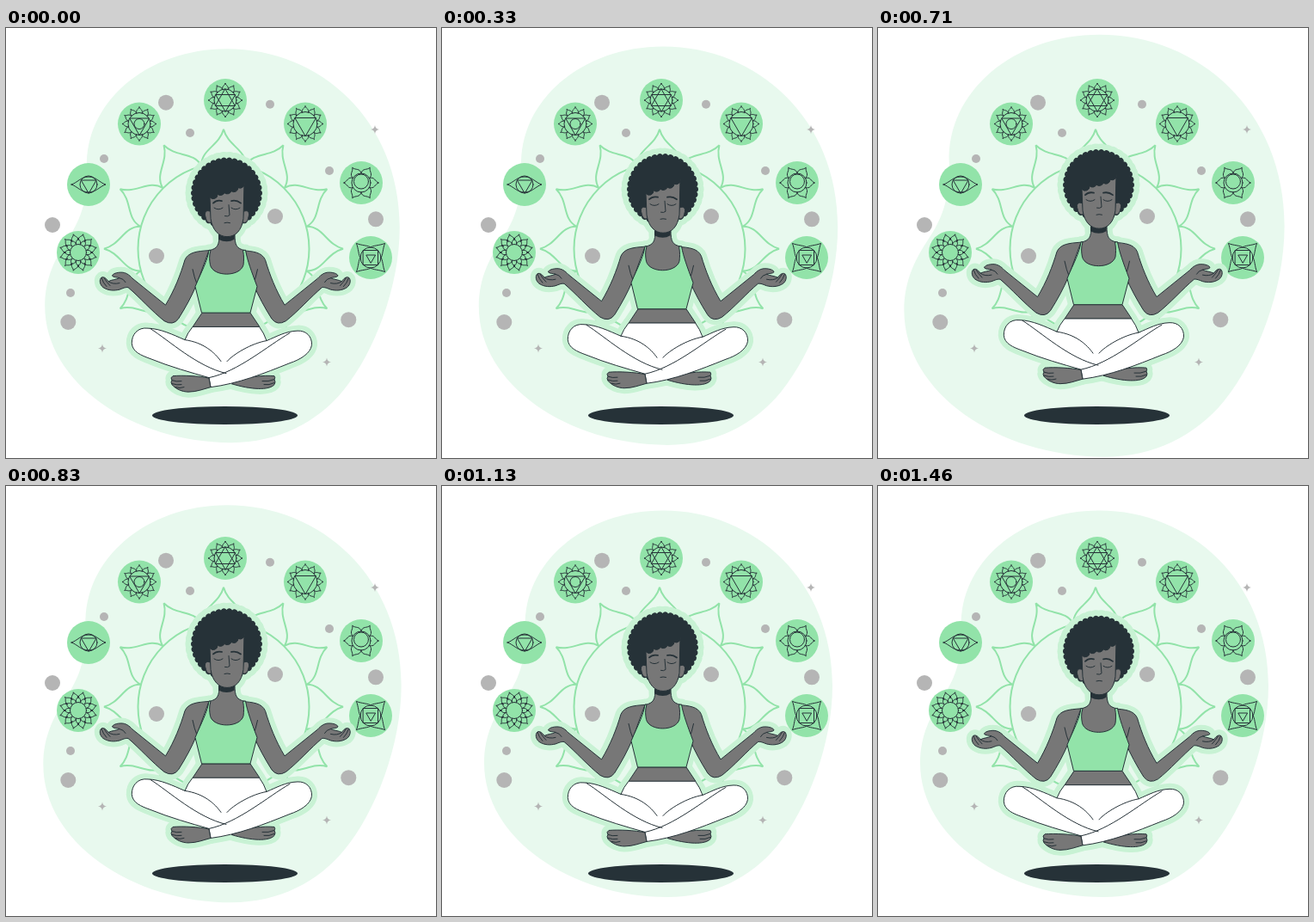
An HTML page for the animation above (1.5 s loop, 500 px wide and 500 px high).

```html
<!DOCTYPE html>
<html lang="en">
<head>
<meta charset="utf-8">
<title>Floating meditation</title>
<style>
  html, body { margin: 0; width: 100%; height: 100%; overflow: hidden; background: #fff; }
  svg { display: block; width: 100vw; height: 100vh; }
  .line { fill: none; stroke: #263238; stroke-width: 1; stroke-linecap: round; }
  .skin { fill: #777; stroke: #263238; }
  .green { fill: #92e3a9; stroke: #263238; }
  .white { fill: #fff; stroke: #263238; }
  .dark { fill: #263238; }
  .brow { fill: none; stroke: #263238; stroke-width: 1.8; stroke-linecap: round; }
  .lotus { fill: none; stroke: #92e3a9; stroke-width: 2; }
  .halo * { fill: #c8f2d4; stroke: #c8f2d4; stroke-width: 13; stroke-linejoin: round; }
</style>
</head>
<body>
<svg id="stage" viewBox="0 0 500 500"></svg>
<script>
const LOOP = 1500, LEAD = 27;
const stage = document.getElementById('stage');

const polar = (deg, r) => {
  const a = deg * Math.PI / 180;
  return `${(r * Math.sin(a)).toFixed(2)} ${(-r * Math.cos(a)).toFixed(2)} `;
};
const path = (cls, d) => `<path class="${cls}" d="${d}"/>`;
const at = (x, y, content) => `<g transform="translate(${x} ${y})">${content}</g>`;
const ring = r => `<circle class="line" r="${r}"/>`;
const mirror = content => content + `<g transform="translate(509.5 0) scale(-1 1)">${content}</g>`;

// Ring of n pointed petals between radii r0 and r1
function petals(n, r0, r1, twist = 0, bulge = .48) {
  const half = 180 / n, k = r1 - r0;
  let d = '';
  for (let i = 0; i < n; i++) {
    const mid = twist + i * 2 * half;
    const p = (side, r) => polar(mid + side * half, r0 + r * k);
    d += 'M' + p(-1, 0) + 'C' + p(-.85, bulge) + p(-.16, .5) + p(0, 1)
       + 'C' + p(.16, .5) + p(.85, bulge) + p(1, 0);
  }
  return d;
}
const flower = (...args) => path('line', petals(...args));
const triangle = (r, turn = 180) =>
  path('line', 'M' + [0, 120, 240].map(a => polar(a + turn, r)).join('L') + 'Z');

const chakras = [
  [155, 111.5, ring(13) + flower(12, 13, 20, 0, .7) + triangle(13) + ring(6)],
  [255, 84, ring(13) + flower(12, 13, 20, 0, .7) + triangle(13) + triangle(13, 0)],
  [348, 111.5, ring(14) + flower(12, 14, 21, 0, .7) + triangle(14)],
  [96, 182, ring(10) + triangle(10) +
    path('line', 'M-20 0C-13-2-9-9 0-9S13-2 20 0C13 2 9 9 0 9S-13 2-20 0Z')],
  [413, 180, ring(11) + flower(6, 11, 20.5, 30, .7) + `<circle class="line" cy="-1.5" r="8.5"/>`],
  [84, 261, ring(9.5) + flower(12, 10, 17, 0, .7) + flower(12, 14.5, 22, 15, .7)],
  [424, 267, ring(12) + flower(4, 12, 23.5, 45, .2) + path('line', 'M-8.5-8.5h17v17h-17Z') + triangle(6)]
].map(([x, y, symbol]) => at(x, y, '<circle r="25" fill="#92e3a9"/>' + symbol)).join('');

const dots = [
  [186, 86.7, 9], [307, 88.7, 5], [214, 122, 5], [114, 152, 5], [376, 166, 5], [54, 229, 9],
  [430, 222.3, 9], [313, 219, 9], [175, 265, 9], [75, 308, 5], [72.3, 342, 9], [398.3, 339.2, 9]
].map(([x, y, r]) => `<circle cx="${x}" cy="${y}" r="${r}"/>`).join('');
const stars = [[429, 118], [112, 372.5], [373, 388.5]]
  .map(([x, y]) => at(x, y, '<path d="M0-5Q.6-.6 5 0Q.6.6 0 5Q-.6.6-5 0Q-.6-.6 0-5Z"/>')).join('');

function hair() {
  const n = 38;
  let d = '';
  for (let i = 0; i <= n; i++) d += (i ? 'A3.8 3.8 0 0 1 ' : 'M') + polar(i * 360 / n, 39.8);
  return at(256.5, 192.3, path('dark', d + 'Z'));
}

const arm =
  path('skin', `M236 259C222 260 212 261 208 270C203 287 196 305 185.5 322.5L147 291.5C143 287 139 284.5 134 284.5
    C129 284.5 124 286 123.5 288.5C125 290.5 129 290 132 291C128 293 123 293 119 295C117 292 114 289 111 290.5
    C108 293 109 299 113 302C119 306 126 306 132 304.5C136 303 139 301.5 142 302C155 313 170 330 184 341
    Q194 347 200.5 338.5C209 325 216 312 221 300Z`) +
  path('line', 'M217 281Q219 291 222 298M132 291Q137 292 139 296M119 295Q124 299 132 297M111 291Q113 297 117 301M114 291Q117 296 121 300');

const face =
  path('skin', 'M238 214C233 211 230 215 232 220C233 226 236 228 239 226ZM276 214C281 211 284 215 282 220C281 226 278 228 275 226Z') +
  path('skin', `M237 197L238 222C240 236 248 243 257 243C267 243 274 236 276 222L277 180
    A5 5 0 0 1 270 186A5 5 0 0 1 262 190A5 5 0 0 1 254 192A5 5 0 0 1 246 193.5A5 5 0 0 1 237 197Z`) +
  path('brow', 'M241 204Q245 200 251 201.5M262 201.5Q268 200 273 204') +
  path('line', 'M242 209.5Q247 213 252 209.5M262 209.5Q267 213 272 209.5M259 206L260 218Q258 220 254.5 219M254 227Q257 226 260.5 227');

const torso =
  path('skin', 'M236 259C246 257 248 253 248 240H266C266 253 268 257 278 259L284 292H230Z') +
  path('dark', 'M247 240H266L265.5 246Q257 251 247 246Z') +
  path('skin', 'M228 331.5H284L295 348H217Z') +
  path('green', `M236 258.5C234 272 228 282 220 301L227.5 331.5H284L292 301C285 282 281 272 278.5 258.5L275.5 259
    C277 266 276.5 271 276 276C272 290 241 290 237.5 276C236.5 271 236 265 238 259Z`);

const legs =
  path('skin', 'M262 414C280 405 300 404 312 405Q313.5 407 312 409Q314 412 312 415C306 422 285 421 262 414Z') +
  path('line', 'M298 411Q305 412 312 409M300 415Q306 416 312 413') +
  path('white', `M217 347.8H294.5Q300 355 303 364C315 359 325 353 339 352.5C349 352 356 359 355.5 369
    C354 379 342 386 330 390C300 402 270 414 238 418L236 407C215 401 190 394 168 385C157 381 147 377 146.3 367
    C146 357 153 348 165 349.5C180 350 194 357 208 363Q211 355 217 347.8Z`) +
  path('line', `M208 363C230 366 243 378 250 388M303 364C285 367 264 380 257 388
    M168 350C190 364 222 394 256 402M330 355C304 370 270 400 236 407`) +
  path('skin', `M236 407.5C225 405 205 404 194 405Q190.5 407 193 410Q191 412 193 415C197 420 205 423.5 212 423.5
    C222 423.5 230 420 238 418Z`) +
  path('line', 'M193 410Q198 412 204 411M193 414Q199 416 204 415M197 418Q202 420 207 418');

const figure = mirror(arm) + hair() + torso + face + legs;

stage.innerHTML = `
  <path id="blob" fill="#e8f9ee" d="M257 28.5C363 28.5 454 110 454 232C454 300 425 375 390 418C360 455 315 478 262 478
    C150 478 49 410 49 322C49 289 62 266 75 246C88 226 98 205 97 165C94 90 165 28.5 257 28.5Z"/>
  ${at(253, 256.7, '<circle class="lotus" r="99.5"/>' + path('lotus', petals(12, 100, 139)))}
  <g fill="#b5b5b5">${dots}${stars}</g>
  ${chakras}
  <ellipse class="dark" cx="254.5" cy="450.5" rx="84.5" ry="10.5"/>
  <g id="floater"><g class="halo">${figure}</g>${figure}</g>`;

const blob = document.getElementById('blob');
const floater = document.getElementById('floater');
const beat = [[0, 0], [.1, 1], [.3, 0], [.4, 0], [.5, 1], [.6, 0], [1, 0]];

function pulse(p) {
  const i = beat.findIndex(([end]) => p < end);
  const [a, from] = beat[i - 1], [b, to] = beat[i];
  return from + (to - from) * (p - a) / (b - a);
}

function draw(now) {
  const p = (now + LEAD) % LOOP / LOOP;
  const lift = 10 * (1 - Math.abs(1 - 2 * p));
  floater.setAttribute('transform', `translate(0 ${-lift})`);
  blob.setAttribute('transform', `translate(251.5 253.3) scale(${1 + .1 * pulse(p)}) translate(-251.5 -253.3)`);
}

const start = performance.now();
function tick() {
  draw(performance.now() - start);
  requestAnimationFrame(tick);
}
tick();
</script>
</body>
</html>
```
